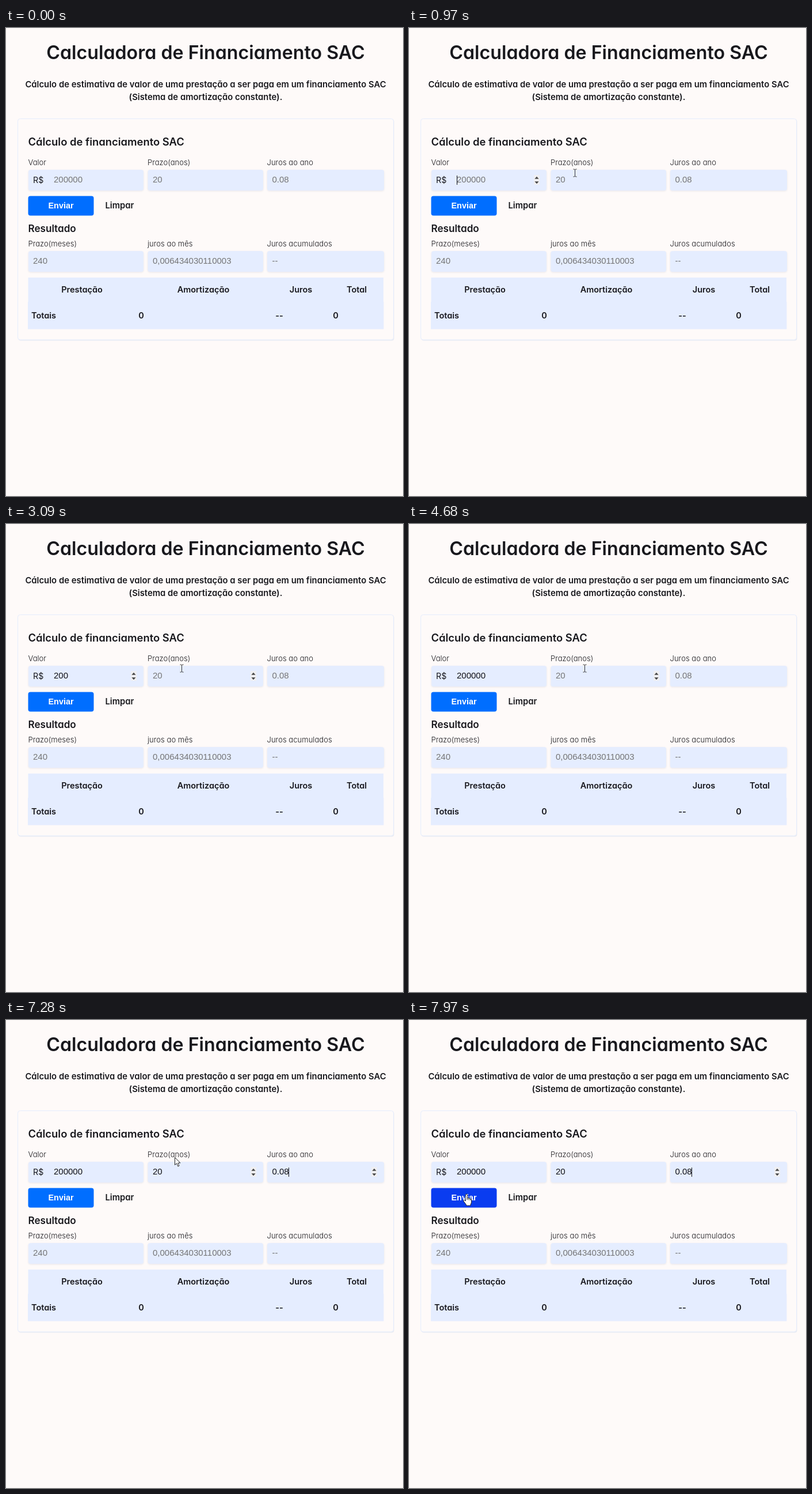
These frames come from a looping animation (690x812 px, 8 s). An HTML page:

```html
<!DOCTYPE html>
<html lang="pt-BR">
<head>
<meta charset="utf-8">
<title>Calculadora de Financiamento SAC</title>
<style>
  html, body { margin: 0; width: 100%; height: 100%; overflow: hidden; background: #fefaf9; }
  svg { display: block; }
  text { font: 600 14.5px Inter, "Open Sans", sans-serif; font-feature-settings: "cv11"; font-optical-sizing: none; fill: #18181d; white-space: pre; }
  .mid { text-anchor: middle; }
  .title { font-size: 32.2px; }
  .lead { font-size: 14.8px; letter-spacing: .03px; }
  .h2 { font-size: 18.4px; }
  .h3 { font-size: 17.1px; }
  .label { font-size: 13px; font-weight: 300; letter-spacing: .05px; }
  .prefix { font-size: 14.2px; font-weight: 400; }
  .limpar { font-size: 14.8px; }
  .input { font: 400 15px "Liberation Sans", Arial, sans-serif; fill: #757575; }
  .typed { fill: #101014; }
  .send { font: 700 14.4px "Liberation Sans", Arial, sans-serif; fill: #fff; }
  .field { fill: #e5edff; filter: drop-shadow(0 1px 1.5px rgba(70, 80, 120, .12)); }
</style>
</head>
<body>
<svg width="690" height="812" viewBox="0 0 690 812">
  <defs>
    <g id="spin">
      <rect x="-5" y="255" width="10" height="17" fill="#efeff2"/>
      <path d="M-3.6 261.7L0 257.7L3.6 261.7ZM-3.6 266.3L0 270.3L3.6 266.3Z" fill="#444"/>
    </g>
  </defs>

  <text class="title mid" x="347" y="54">Calculadora de Financiamento SAC</text>
  <text class="lead mid" x="347" y="103">Cálculo de estimativa de valor de uma prestação a ser paga em um financiamento SAC</text>
  <text class="lead mid" x="347" y="125">(Sistema de amortização constante).</text>

  <rect x="21.5" y="158.5" width="653" height="384" rx="4" fill="#e9ebf2"/>
  <rect x="20.5" y="157.5" width="653" height="383.5" rx="4" fill="#fefaf9" stroke="#e5edfd"/>

  <text class="h2" x="38.5" y="204">Cálculo de financiamento SAC</text>
  <text class="h3" x="38.5" y="354">Resultado</text>
  <g id="fields"></g>
  <text class="prefix" x="47" y="269">R$</text>

  <rect id="button" x="38.5" y="291.5" width="114" height="34" rx="4"/>
  <text class="send mid" x="95.5" y="313">Enviar</text>
  <text class="limpar" x="172.5" y="313">Limpar</text>

  <path d="M38.5 433H656V475H656.5V522.5H38V475H38.5Z" fill="#e5edff"/>
  <text class="mid" x="132" y="459">Prestação</text>
  <text class="mid" x="343" y="459">Amortização</text>
  <text class="mid" x="512.5" y="459">Juros</text>
  <text class="mid" x="609.5" y="459">Total</text>
  <text x="44" y="504">Totais</text>
  <text class="mid" x="235" y="504">0</text>
  <text class="mid" x="475" y="504">--</text>
  <text class="mid" x="573" y="504">0</text>

  <use class="spin" href="#spin" x="222"/>
  <use class="spin" href="#spin" x="430"/>
  <use class="spin" href="#spin" x="640"/>
  <rect id="caret" y="256" width="1" height="16" fill="#101014"/>

  <g id="cursor">
    <path id="arrow" d="M.5 .5V13.5L3.6 10.7L5.8 15.9L8 15L5.8 10H10Z" fill="#fff" stroke="#222"/>
    <path id="beam" d="M-3 -6.5H-1L0 -5.5L1 -6.5H3M0 -5.5V5.5M-3 6.5H-1L0 5.5L1 6.5H3" fill="none" stroke="#333"/>
    <path id="hand" d="M-1.7 12V1.5Q-1.7 0 -.2 0Q1.3 0 1.3 1.5V7Q3 5.800 4 7.5Q5.7 6.6 6.5 8.3Q8.5 7.8 8.5 10V14Q8.5 16 7 18V20H-.5V18.5L-4.7 13Q-6 10.8 -4.5 10.3Q-3.4 9.9 -1.7 12ZM1.3 7V10M4 7.5V10.5M6.5 8.3V10.8" fill="#fff" stroke="#222"/>
  </g>
</svg>

<script>
const LOOP = 8000;
const HOVER_LAG = 70;
const DIGIT = 8.34, DOT = 4.17;
const $ = id => document.getElementById(id);

const fields = [
  { x: 39, w: 200, pad: 44, hint: '200000', label: 'Valor' },
  { x: 246.5, w: 200.5, pad: 8.5, hint: '20', label: 'Prazo(anos)' },
  { x: 454, w: 203, pad: 8.5, hint: '0.08', label: 'Juros ao ano' },
  { x: 39, w: 200, pad: 8, hint: '240', label: 'Prazo(meses)', low: true },
  { x: 246.5, w: 200.5, pad: 8.5, hint: '0,006434030110003', label: 'juros ao mês', low: true },
  { x: 454, w: 203, pad: 8.5, hint: '--', label: 'Juros acumulados', low: true }
];

// [time, field, characters typed]
const keys = [
  [0, -1, 0], [770, 0, 0], [2100, 0, 1], [2430, 0, 2], [2560, 0, 3], [3160, 0, 4],
  [3360, 0, 5], [3490, 0, 6], [4150, 1, 0], [4750, 1, 1], [4880, 1, 2],
  [5080, 2, 0], [5810, 2, 1], [6220, 2, 2], [6420, 2, 3], [6750, 2, 4]
];

// spans in which the caret is blinked off
const blinks = [[1300, 1900], [3090, 3160], [4020, 4150], [4680, 4750], [5610, 5810], [7360, 7890]];

// [time, shape, x, y]
const moves = [
  [0, '', 0, 0], [70, 'arrow', 610, 787], [140, 'arrow', 565, 722], [210, 'arrow', 490, 640],
  [280, 'arrow', 405, 558], [350, 'arrow', 322, 482], [420, 'beam', 240, 410],
  [490, 'arrow', 184, 352], [560, 'hand', 147, 308], [630, 'arrow', 138, 284],
  [700, 'beam', 136, 268], [840, 'beam', 136, 264],
  [900, 'beam', 212, 260], [970, 'beam', 288.5, 251.5], [1040, 'beam', 305.5, 250.5],
  [7280, 'arrow', 293, 238], [7360, 'arrow', 272, 216], [7430, 'arrow', 243, 210],
  [7500, 'arrow', 211, 222], [7560, 'beam', 179, 252], [7630, 'beam', 150, 273],
  [7700, 'hand', 125, 293], [7770, 'hand', 110, 299], [7840, 'hand', 103, 302],
  [7970, 'hand', 100, 302]
];

function add(tag, attrs, text = '') {
  const el = document.createElementNS('http://www.w3.org/2000/svg', tag);
  for (const name in attrs) el.setAttribute(name, attrs[name]);
  el.textContent = text;
  return $('fields').appendChild(el);
}

for (const f of fields) {
  const y = f.low ? 387 : 246;
  add('text', { class: 'label', x: f.x - .5, y: y - 8.5 }, f.label);
  add('rect', { class: 'field', x: f.x, y, width: f.w, height: 36, rx: 4 });
  f.text = add('text', { class: 'input', x: f.x + f.pad, y: y + 22.4 }, f.hint);
}

const spinners = document.querySelectorAll('.spin');
const at = (steps, t) => steps.findLast(s => s[0] <= t);
const show = (el, on) => el.setAttribute('visibility', on ? 'visible' : 'hidden');
const inside = (x, y, f) => x >= f.x && x <= f.x + f.w && y >= 246 && y <= 282;

function draw(t) {
  const [, focus, typed] = at(keys, t);
  const [, shape, x, y] = at(moves, t);
  const [, , hoverX, hoverY] = at(moves, Math.max(0, t - HOVER_LAG));

  fields.slice(0, 3).forEach((f, i) => {
    const count = i < focus ? f.hint.length : i === focus ? typed : 0;
    f.text.textContent = count ? f.hint.slice(0, count) : f.hint;
    f.text.classList.toggle('typed', count > 0);
    show(spinners[i], i === focus || inside(hoverX, hoverY, f));
  });

  show($('caret'), focus >= 0 && !blinks.some(([a, b]) => t >= a && t < b));
  if (focus >= 0) {
    const f = fields[focus];
    const width = [...f.hint.slice(0, typed)].reduce((sum, c) => sum + (c === '.' ? DOT : DIGIT), 0);
    $('caret').setAttribute('x', Math.floor(f.x + f.pad + width + .3));
  }

  for (const name of ['arrow', 'beam', 'hand']) show($(name), name === shape);
  $('cursor').setAttribute('transform', `translate(${x} ${y})`);
  $('button').setAttribute('fill', shape === 'hand' ? '#0a3cf0' : '#006eff');
}

function tick() {
  draw(performance.now() % LOOP);
  requestAnimationFrame(tick);
}
tick();
</script>
</body>
</html>
```
